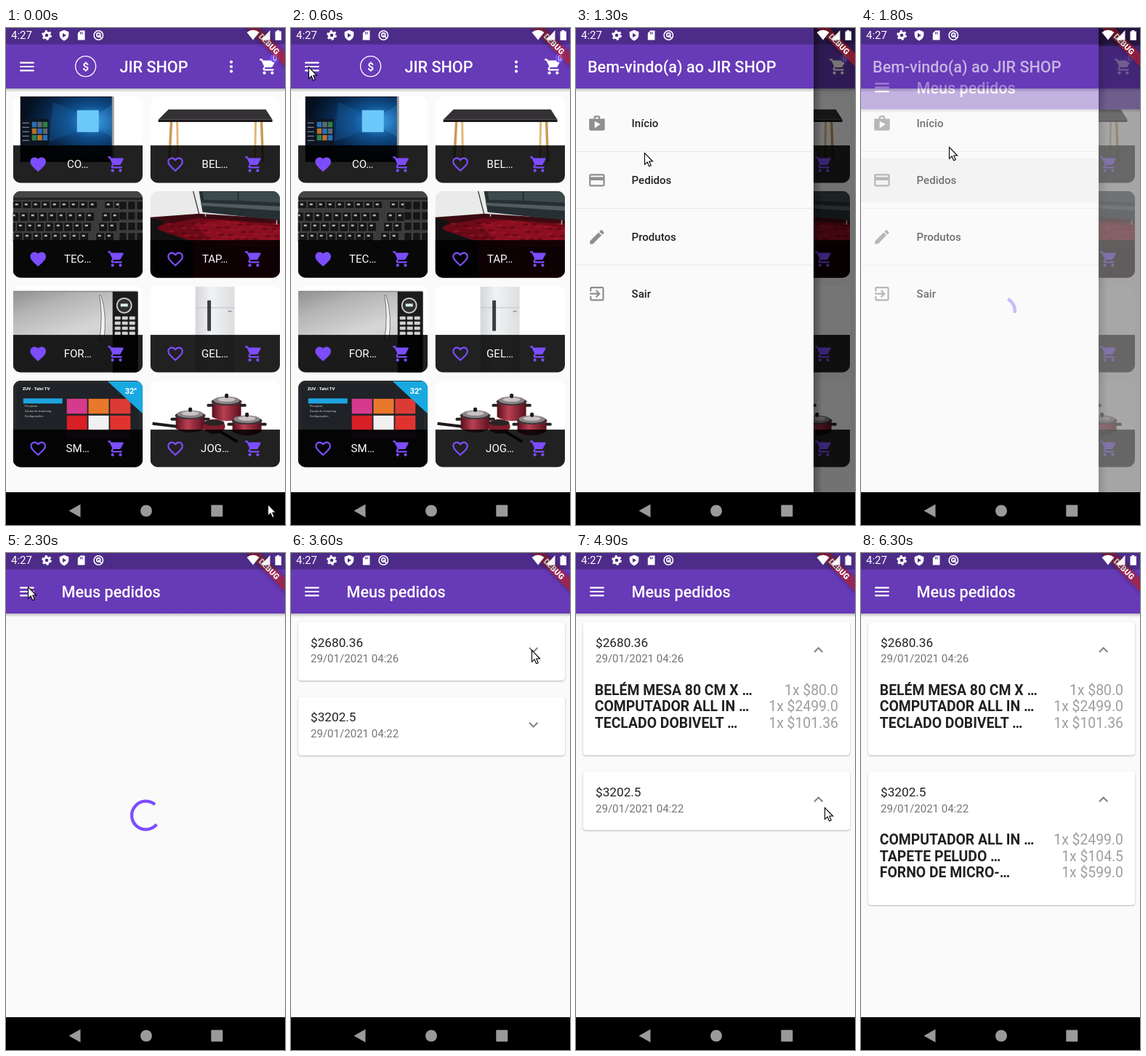
Recreate the animation shown at these times as an HTML page. Size 384 px wide and 682 px high, loop 6.7 s.

```html
<!DOCTYPE html>
<html lang="pt">
<head>
<meta charset="utf-8">
<title>JIR SHOP</title>
<style>
html, body { margin: 0; width: 100%; height: 100%; overflow: hidden; background: #fafafa; }
svg { display: block; width: 100vw; height: 100vh; font-family: Roboto, "Noto Sans", sans-serif; }
.bar { font-size: 21.6px; font-weight: 500; fill: #fff; }
.nav { font-size: 15.06px; font-weight: 500; fill: #212121; }
.tile { font-size: 15.06px; fill: #fff; text-anchor: middle; }
.sum { font-size: 17.2px; fill: #212121; }
.date { font-size: 15.06px; fill: #757575; }
.item { font-size: 19.36px; font-weight: 700; fill: #212121; }
.qty { font-size: 19.36px; fill: #9e9e9e; text-anchor: end; }
.card { fill: #fff; filter: drop-shadow(0 1px 1px rgba(0,0,0,.28)); }
.ribbon { filter: drop-shadow(0 0 3px rgba(0,0,0,.5)); }
</style>
</head>
<body>
<svg id="stage" viewBox="0 0 384 682" preserveAspectRatio="none"></svg>
<script>
const LOOP = 6700, STEP = 100, DP = 1.0757;
const PURPLE = '#673ab7', ACCENT = '#7c4dff';

const ICON = {
  menu: 'M3 18h18v-2H3zM3 13h18v-2H3zM3 6v2h18V6z',
  cart: 'M7 18c-1.1 0-2 .9-2 2s.9 2 2 2 2-.9 2-2-.9-2-2-2zM1 2v2h2l3.6 7.6-1.35 2.45c-.16.28-.25.6-.25.95 0 1.1.9 2 2 2h12v-2H7.4c-.2 0-.3-.2-.2-.4l.9-1.6h7.45c.75 0 1.4-.4 1.75-1l3.6-6.5c.3-.6 0-1.5-.9-1.5H5.2l-.94-2zM17 18c-1.1 0-2 .9-2 2s.9 2 2 2 2-.9 2-2-.9-2-2-2z',
  heart: 'M12 21.35l-1.45-1.32C5.4 15.36 2 12.28 2 8.5 2 5.42 4.42 3 7.5 3c1.74 0 3.41.81 4.5 2.09C13.09 3.81 14.76 3 16.5 3 19.58 3 22 5.42 22 8.5c0 3.78-3.4 6.86-8.55 11.54z',
  hollow: 'M12 18.6C7.1 14.2 4 11.4 4 8.5 4 6.5 5.5 5 7.5 5c1.54 0 3.04 1 3.57 2.36h1.87C13.46 6 14.96 5 16.5 5c2 0 3.5 1.5 3.5 3.5 0 2.9-3.1 5.7-8 10.1z',
  shop: 'M16 6V4c0-1.1-.9-2-2-2h-4c-1.1 0-2 .9-2 2v2H2v13c0 1.1.9 2 2 2h16c1.1 0 2-.9 2-2V6zM10 4h4v2h-4zM9 18V9l7.5 4z',
  pay: 'M20 4H4c-1.1 0-2 .9-2 2v12c0 1.1.9 2 2 2h16c1.1 0 2-.9 2-2V6c0-1.1-.9-2-2-2zM20 18H4v-6h16zM20 8H4V6h16z',
  edit: 'M3 17.25V21h3.75L17.8 9.94 14.06 6.2zM20.7 7.04c.4-.4.4-1 0-1.4l-2.34-2.35c-.4-.4-1-.4-1.4 0l-1.83 1.83 3.75 3.75z',
  exit: 'M10.1 15.6L11.5 17l5-5-5-5-1.4 1.4 2.57 2.6H3v2h9.67zM19 3H5c-1.1 0-2 .9-2 2v4h2V5h14v14H5v-4H3v4c0 1.1.9 2 2 2h14c1.1 0 2-.9 2-2V5c0-1.1-.9-2-2-2z',
  more: 'M16.6 8.6L12 13.2 7.4 8.6 6 10l6 6 6-6z',
  less: 'M12 8l-6 6 1.4 1.4 4.6-4.6 4.6 4.6L18 14z'
};
ICON.outline = ICON.heart + ICON.hollow;

const rect = (x, y, w, h, fill, more = '') => `<rect x="${x}" y="${y}" width="${w}" height="${h}" fill="${fill}" ${more}/>`;
const path = (d, fill, more = '') => `<path d="${d}" fill="${fill}" ${more}/>`;
const circle = (x, y, r, fill, more = '') => `<circle cx="${x}" cy="${y}" r="${r}" fill="${fill}" ${more}/>`;
const oval = (x, y, rx, ry, fill, more = '') => `<ellipse cx="${x}" cy="${y}" rx="${rx}" ry="${ry}" fill="${fill}" ${more}/>`;
const line = (d, color, w) => path(d, 'none', `stroke="${color}" stroke-width="${w}"`);
const text = (x, y, cls, s) => `<text x="${x}" y="${y}" class="${cls}">${s}</text>`;
const group = (id, body, more = '') => `<g id="${id}" ${more}>${body}</g>`;
const icon = (name, x, y, fill, more = '') =>
  `<path d="${ICON[name]}" fill="${fill}" fill-rule="evenodd" transform="translate(${x - 12 * DP} ${y - 12 * DP}) scale(${DP})" ${more}/>`;
const range = (n, f) => Array.from({ length: n }, (_, i) => f(i)).join('');
const stops = list => list.map(([o, c, a = 1]) => `<stop offset="${o}" stop-color="${c}" stop-opacity="${a}"/>`).join('');
const fade = (id, list, dir = 'x2="0" y2="1"') => `<linearGradient id="${id}" x1="0" y1="0" ${dir}>${stops(list)}</linearGradient>`;
const toRight = 'x2="1" y2="0"';

// Product pictures, drawn in tile coordinates
const art = {
  computer: () => rect(10, 0, 128, 90, '#0a0d13') + rect(11, 1, 125, 84, 'url(#screen)') +
    path('M100 34L136 12V56Z', '#4fb4f5', 'opacity=".2"') +
    path('M55 8L88 22V48L50 62Z', '#1c6fb8', 'opacity=".25"') + rect(88, 19, 30, 30, '#6cc8fb') +
    rect(11, 31, 38, 40, '#0d1623') + range(9, i =>
      rect(26 + i % 3 * 7.5, 35 + (i / 3 | 0) * 9, 6.5, 7.5, ['#2b6fb5', '#b8702a', '#2f7f4a', '#5d6872'][i * 3 % 4])) +
    range(5, i => rect(13, 36 + i * 6, 9, 1, '#99a')) + rect(136, 0, 3, 90, '#9aa0a5'),
  table: () => line('M37 34L38 90M145 34L144 90', '#e2b878', 3) + line('M29 34L26 90M153 34L155 90', '#c99a55', 3.5) +
    path('M25 18H159L168 32H11Z', '#333133') + rect(11, 32, 157, 3.2, '#1a181a'),
  keyboard: () => rect(0, 0, 179, 119, '#3b3b3c') + rect(0, 0, 179, 9, '#454546') + rect(0, 9, 179, 3, '#222223') +
    range(44, i => {
      const r = i / 11 | 0, c = i % 11;
      const x = c * 13 - r * 4 + (c > 8 ? 9 : 0), y = [14, 29, 43, 57][r];
      return rect(x, y, 12, r ? 12.5 : 10, '#161616', 'rx="1.5" stroke="#505051" stroke-width=".7"') +
        rect(x + 3, y + 3, 4, 2.5, '#b5b5b5');
    }) + range(12, i => rect(146 + i % 3 * 12, 14 + (i / 3 | 0) * 14.3, 10.5, 11.5, '#161616', 'rx="1.5" stroke="#505051" stroke-width=".7"')),
  rug: () => rect(0, 0, 179, 119, '#e9eae9') + line('M59 0L67 31', '#333', 1.3) +
    path('M0 36L67 31L179 38V119H0Z', '#3b0a10') + path('M8 48L66 37L179 45V119H60Z', '#6f0a18') +
    path('M60 44L100 40L179 50V76H90Z', '#8b0f20') +
    range(70, i => oval(20 + i * 47 % 158, 42 + i * 29 % 30, 4, 1.2, i % 2 ? '#a5182a' : '#4a0610', 'opacity=".55"')) +
    path('M0 36L20 42L8 52L60 70V119H0Z', '#121213') +
    path('M67 0H179V40L72 29Z', '#263032') + path('M72 1H120V13L74 12ZM122 1H179V16L122 13Z', '#3d4a4c') +
    path('M70 16L179 21V27L70 20Z', '#4f5d5f') + line('M76 29V35M174 40V46', '#bbb', 1.5),
  oven: () => rect(0, 7, 171, 112, 'url(#steel)') + rect(0, 7, 171, 1.5, '#8b8b8b') +
    path('M121 13Q130 40 125 75H119Q124 40 119 13Z', '#f2f2f2', 'stroke="#555" stroke-width=".8"') +
    rect(137, 8, 35, 111, '#1b1b1c') + circle(153, 27, 10, '#303030', 'stroke="#ccc" stroke-width="1.8"') + rect(148, 24.5, 10, 4, '#d8eef0') +
    range(12, i => rect(140 + i % 3 * 10, 42 + (i / 3 | 0) * 7, 8, 4.5, '#cfcfcf', 'rx="1"')),
  fridge: () => rect(62, 1, 54, 118, 'url(#door)') + line('M62 30H116', '#bfc2c5', 1) + rect(78.5, 20, 5, 42, '#3c3e42', 'rx="1"') +
    rect(107, 34, 5, 2, '#9aa0a6'),
  tv: () => rect(0, 0, 179, 119, '#26282b') + rect(5, 4, 168, 100, '#1f2226') +
    `<text x="13" y="13.5" font-size="6" font-weight="700" fill="#fff">ZUV · Talvi TV</text>` +
    rect(14, 24.5, 54, 7, '#1ea4e0') +
    ['Pesquisar', 'Canais de streaming', 'Configurações'].map((s, i) =>
      `<text x="16" y="${36.5 + i * 6.7}" font-size="4" fill="#ccc">${s}</text>`).join('') +
    ['#d63a8c', '#e8792c', '#dc3b35', '#d81f26', '#f1f1f1', '#e0332f'].map((c, i) =>
      rect(74 + i % 3 * 29.8, 25 + (i / 3 | 0) * 23, 28, 20.5, c)).join('') +
    rect(74, 71, 88, 8, '#5c2a70') + path('M130 1H179V46Z', '#18a9e1') +
    `<text x="154" y="18" font-size="11" font-weight="700" fill="#fff">32''</text>`,
  pans: () => {
    const pot = (x, y, w, h) => path(`M${x - w} ${y}V${y + h - 5}Q${x} ${y + h + 6} ${x + w} ${y + h - 5}V${y}Z`, 'url(#pot)') +
      oval(x, y, w + 1, w * .26, '#3a3538') + oval(x, y - 2, w - 2, w * .27, '#8b8386') + oval(x, y - 3, w * .6, w * .15, '#c9c2c3') +
      rect(x - 2.5, y - 11, 5, 6, '#1d1a1b', 'rx="2"') +
      rect(x - w - 7, y + 3, 8, 4, '#222', 'rx="1.5"') + rect(x + w - 1, y + 3, 8, 4, '#222', 'rx="1.5"');
    return pot(105, 29, 20, 26) + pot(55, 48, 20, 23) + line('M3 59L36 63', '#1e1b1c', 4) +
      pot(133, 55, 20, 20) + oval(88, 63, 15, 10, '#7f1d2c') + oval(88, 58, 14, 4, '#2a2426') + line('M96 70L120 84', '#1e1b1c', 4);
  }
};

const tiles = [
  ['computer', 'CO…', 1], ['table', 'BEL…', 0], ['keyboard', 'TEC…', 1], ['rug', 'TAP…', 0],
  ['oven', 'FOR…', 1], ['fridge', 'GEL…', 0], ['tv', 'SM…', 0], ['pans', 'JOG…', 0]
];
const tile = ([name, label, liked], i) =>
  `<g transform="translate(${i % 2 ? 198.6 : 9.7} ${93.8 + (i >> 1) * 130})" clip-path="url(#round)">` +
  rect(0, 0, 178.4, 118.9, '#fff') + art[name]() + rect(0, 67.3, 178.4, 51.6, '#000', 'opacity=".87"') +
  icon(liked ? 'heart' : 'outline', 34.5, 93.4, ACCENT) + text(89, 98.4, 'tile', label) + icon('cart', 142.4, 93.2, ACCENT) + '</g>';

const appBar = w => rect(0, 83, w, 5, 'url(#under)') + rect(0, -4, w, 87, PURPLE);

const home = rect(0, 0, 384, 682, '#fafafa') + tiles.map(tile).join('') + appBar(384) +
  icon('menu', 28.9, 53, '#fff') +
  circle(109.6, 52.6, 14, 'none', 'stroke="#fff" stroke-width="1.3"') +
  `<text x="109.6" y="58" font-size="15.5" font-weight="700" fill="#fff" text-anchor="middle">$</text>` +
  text(156.5, 61.2, 'bar', 'JIR SHOP') +
  [46.6, 53, 59.4].map(y => circle(310, y, 2.1, '#fff')).join('') + icon('cart', 361, 53, '#fff') +
  circle(370, 41, 6.5, ACCENT) + `<text x="370" y="44.5" font-size="10" fill="#fff" text-anchor="middle">0</text>`;

const links = [['shop', 'Início'], ['pay', 'Pedidos'], ['edit', 'Produtos'], ['exit', 'Sair']];
const drawer = rect(327, 0, 12, 682, 'url(#side)') + rect(-10, 0, 337, 682, '#fafafa') +
  group('press', rect(0, 179, 327, 60, '#000', 'opacity=".04"')) +
  links.map(([name, label], i) => {
    const y = 131 + i * 77.9;
    return icon(name, 28.9, y, '#8f8f8f') + text(76.6, y + 5.3, 'nav', label) +
      (i < 3 ? rect(0, y + 38, 327, 1, '#e8e8e8') : '');
  }).join('') + appBar(327) + text(16, 61.2, 'bar', 'Bem-vindo(a) ao JIR SHOP');

const order = (id, sum, date, items) => group(id,
  `<rect class="card" x="9.7" y="94.5" width="367.4" height="80.5" rx="4.3"/>` +
  text(27, 128.8, 'sum', sum) + text(27, 150.3, 'date', date) +
  icon('more', 333.7, 133, '#858585', 'class="down"') + icon('less', 333.7, 133, '#858585', 'class="up"') +
  `<clipPath id="${id}Clip"><rect x="10" y="175" width="367" height="0"/></clipPath><g clip-path="url(#${id}Clip)">` +
  items.map(([name, qty], i) => text(25.8, 194.6 + i * 22.7, 'item', name) + text(361, 194.6 + i * 22.7, 'qty', qty)).join('') + '</g>');

const orders = rect(0, 0, 384, 682, '#fafafa') + appBar(384) + icon('menu', 28.9, 53, '#fff') +
  text(76.6, 61.2, 'bar', 'Meus pedidos') +
  `<path id="spin" fill="none" stroke="${ACCENT}" stroke-width="4.3"/>` +
  group('list',
    order('first', '$2680.36', '29/01/2021 04:26',
      [['BELÉM MESA 80 CM X …', '1x $80.0'], ['COMPUTADOR ALL IN …', '1x $2499.0'], ['TECLADO DOBIVELT …', '1x $101.36']]) +
    order('second', '$3202.5', '29/01/2021 04:22',
      [['COMPUTADOR ALL IN …', '1x $2499.0'], ['TAPETE PELUDO …', '1x $104.5'], ['FORNO DE MICRO-…', '1x $599.0']]));

const banner = `<g transform="translate(388 -4) rotate(45)">` + rect(-45, 30.1, 90, 12.9, '#b71c1c', 'opacity=".63" class="ribbon"') +
  `<text y="40.5" font-size="11" font-weight="900" fill="#fff" text-anchor="middle">DEBUG</text></g>`;

const status = rect(0, 0, 384, 22.5, '#000', 'opacity=".25"') +
  `<text x="7" y="15.3" font-size="15" fill="#fff">4:27</text>` +
  circle(56, 10, 3.8, 'none', 'stroke="#fff" stroke-width="3"') +
  circle(56, 10, 6, 'none', 'stroke="#fff" stroke-width="1.8" stroke-dasharray="3.14"') +
  path('M80 2.8L86.3 5.2V10Q86 15 80 17.5Q74 15 73.7 10V5.2ZM78 7V13L83 10Z', '#fff', 'fill-rule="evenodd"') +
  path('M102.5 3.5H108.5V16.5H98.8V7ZM102 5.5V8.5H103.2V5.5ZM104.2 5.5V8.5H105.4V5.5Z', '#fff', 'fill-rule="evenodd"') +
  circle(127.3, 10, 6.2, 'none', 'stroke="#fff" stroke-width="1.6"') + circle(127.3, 9.5, 2.6, 'none', 'stroke="#fff" stroke-width="1.6"') +
  line('M127 9.5L132 14.5', '#fff', 1.6) +
  path('M331.5 6Q340 -.5 348.5 6L340 16.5Z', '#fff') + path('M363.5 3V16.5H351Z', '#fff', 'opacity=".95"') +
  path('M372.8 4.5V3H376.2V4.5H379V16.8H370.5V4.5Z', '#fff');

const keys = rect(0, 637, 384, 45, '#000') + path('M86.5 662.5L102.5 653.6V671.4Z', '#9a9a9a') +
  circle(193, 662.5, 8, '#9a9a9a') + rect(282.3, 654.5, 16, 16, '#9a9a9a', 'rx="1"');

const stage = document.getElementById('stage');
stage.innerHTML = '<defs>' +
  fade('under', [[0, '#000', .25], [1, '#000', 0]]) +
  fade('side', [[0, '#000', .3], [1, '#000', 0]], toRight) +
  `<radialGradient id="screen" cx=".78" cy=".4" r=".75">${stops([[0, '#3aa0e8'], [.35, '#0f4f8e'], [.7, '#08264a'], [1, '#04101f']])}</radialGradient>` +
  fade('steel', [[0, '#8f8f8f'], [.25, '#b4b4b4'], [.6, '#d6d6d6'], [1, '#c4c4c4']], 'x2=".5" y2="1"') +
  fade('door', [[0, '#d3d5d8'], [.4, '#f1f2f3'], [1, '#dcdee0']], toRight) +
  fade('pot', [[0, '#5a0f1c'], [.4, '#b84052'], [1, '#5a0f1c']], toRight) +
  '<clipPath id="round"><rect width="178.4" height="118.9" rx="10.8"/></clipPath></defs>' +
  group('home', home + rect(0, 0, 384, 682, '#000', 'id="scrim"') + group('drawer', drawer)) +
  group('page', orders) + banner + status + keys +
  group('cursor', path('M.5 .5V16.3L4.1 13 6.6 18.8 9.2 17.7 6.8 12H11.6Z', '#fff', 'stroke="#000" stroke-width="1.1"'));

const $ = id => document.getElementById(id);
const clamp = v => Math.min(1, Math.max(0, v));
const set = (el, o) => Object.entries(o).forEach(([k, v]) => el.setAttribute(k, v));
const show = (el, on) => el.setAttribute('visibility', on ? 'inherit' : 'hidden');

function bezier(x1, y1, x2, y2) {
  const at = (a, b, u) => 3 * a * u * (1 - u) ** 2 + 3 * b * u * u * (1 - u) + u ** 3;
  return x => {
    let lo = 0, hi = 1;
    for (let i = 0; i < 24; i++) {
      const mid = (lo + hi) / 2;
      if (at(x1, x2, mid) < x) lo = mid; else hi = mid;
    }
    return at(y1, y2, lo);
  };
}
const fastSlow = bezier(.4, 0, .2, 1), easeIn = bezier(.42, 0, 1, 1);

// time, x, y of the pointer tip
const trail = [
  [0, 360, 653], [600, 24, 53], [900, 24, 53], [1400, 112, 200], [1500, 116, 200], [1700, 116, 200],
  [1800, 121, 163], [2300, 30, 46], [2800, 30, 46], [3500, 321, 130], [3600, 331, 133], [3800, 331, 133],
  [4400, 355, 354], [4500, 350, 346], [4600, 345, 347], [4700, 342, 349], [4900, 342, 349],
  [5300, 290, 430], [5800, 290, 430], [6100, 185, 658], [6700, 185, 658]
];
function pointer(t) {
  const i = Math.max(1, trail.findIndex(p => p[0] >= t));
  const [a, b] = [trail[i - 1], trail[i]], k = (t - a[0]) / (b[0] - a[0]);
  return [1, 2].map(n => a[n] + (b[n] - a[n]) * k);
}

// Critically damped spring
function spring(s) {
  const w = 22.36;
  return s <= 0 ? 0 : 1 - Math.exp(-w * s) * (1 + (w - 1) * s);
}

function spinner(t) {
  const k = (t - 1630) / 667;
  const sweep = 270 * (fastSlow(clamp(k)) - fastSlow(clamp(k - 1)));
  const from = -60 + .2 * (t - 1800) + 270 * fastSlow(clamp(k - 1));
  const at = d => `${192.5 + 19.4 * Math.cos(d * Math.PI / 180)} ${360 + 19.4 * Math.sin(d * Math.PI / 180)}`;
  return `M${at(from)}A19.4 19.4 0 ${sweep > 180 ? 1 : 0} 1 ${at(from + sweep)}`;
}

function expand(id, t, start, y) {
  const el = $(id), grow = 102.6 * clamp((t - start) / 300);
  el.setAttribute('transform', `translate(0 ${y})`);
  el.querySelector('.card').setAttribute('height', 80.5 + grow);
  el.querySelector('clipPath rect').setAttribute('height', grow);
  show(el.querySelector('.down'), t < start);
  show(el.querySelector('.up'), t >= start);
  return grow;
}

function draw(t) {
  const open = spring((t - 790) / 1000), k = clamp((t - 1635) / 300);
  show($('home'), k < 1);
  $('scrim').setAttribute('opacity', .54 * open);
  $('drawer').setAttribute('transform', `translate(${-327 * (1 - open)} 0)`);
  show($('drawer'), open > 0);
  show($('press'), t >= 1700);
  show($('page'), k > 0);
  set($('page'), { opacity: easeIn(k), transform: `translate(0 ${k < 1 ? 170.5 * (1 - fastSlow(k)) : 0})` });
  show($('spin'), t >= 1635 && t < 2500);
  $('spin').setAttribute('d', spinner(t));
  show($('list'), t >= 2500);
  const grow = expand('first', t, 3800, 0);
  expand('second', t, 4900, 102.7 + grow);
  const [x, y] = pointer(t);
  $('cursor').setAttribute('transform', `translate(${Math.round(x)} ${Math.round(y)})`);
  show($('cursor'), t < 6300);
}

const began = performance.now();
function tick() {
  const t = (performance.now() - began) % LOOP;
  draw(Math.floor(t / STEP) * STEP);
  requestAnimationFrame(tick);
}
draw(0);
requestAnimationFrame(tick);
</script>
</body>
</html>
```
